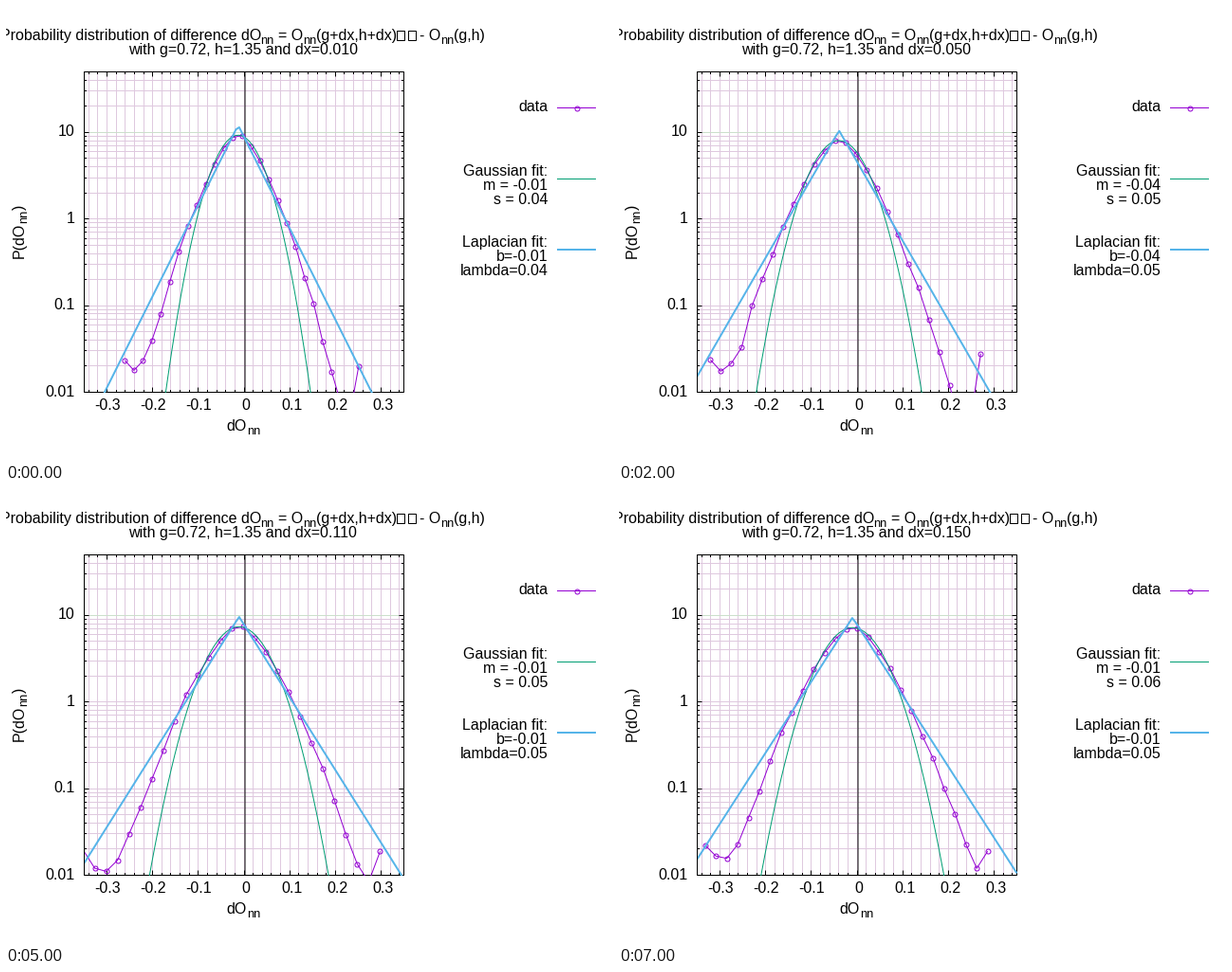
A matplotlib script that plays this animation: 640 px wide and 480 px high, repeating every 8000 ms.

```python
import numpy as np
import matplotlib
import matplotlib.pyplot as plt
from matplotlib.animation import FuncAnimation
from matplotlib.patches import Rectangle

W, H, DPI = 640, 480, 100
PX = 72 / DPI  # one pixel in points
LEFT, RIGHT, TOP, BOTTOM = 82.5, 419.5, 69.5, 407.5
STEPS, BINS = 8, 27
PURPLE, GREEN, BLUE = "#9400d3", "#009e73", "#56b4e9"
GRID, GRID_TEN = "#dfc9df", "#cbdfcb"

# Centre and extent of the distribution at each step.
CENTRE = [-0.013, -0.026, -0.0395, -0.009, -0.0233, -0.011, -0.01, -0.01]
LOW = [-0.261, -0.29, -0.321, -0.306, -0.348, -0.352, -0.342, -0.333]
HIGH = [0.251, 0.261, 0.271, 0.261, 0.234, 0.298, 0.292, 0.286]

matplotlib.rcParams["font.family"] = "Liberation Sans"
fig = plt.figure(figsize=(W / DPI, H / DPI), dpi=DPI, facecolor="white")
ax = fig.add_axes([0, 0, 1, 1])
ax.set_xlim(0, W)
ax.set_ylim(H, 0)
ax.axis("off")


def sx(x):
    return LEFT + (x + 0.35) / 0.7 * (RIGHT - LEFT)


def sy(p):
    return BOTTOM - np.log10(p / 0.01) / np.log10(5000) * (BOTTOM - TOP)


def pixel(v):
    return np.floor(v) + 0.5


def line(x, y, color="black", width=1, **kw):
    return ax.plot(x, y, color=color, lw=width * PX, snap=False,
                   solid_capstyle="butt", **kw)[0]


def label(x, y, s, size=16, **kw):
    return ax.text(x, y, s, fontsize=size * PX, va="baseline", **kw)


def key_label(y, s=""):
    return label(571.4, y, s, ha="right")


def circles(**kw):
    return ax.plot([], [], "o", ms=5 * PX, mfc="none", mec=PURPLE,
                   mew=PX, **kw)[0]


def draw_axes():
    for i in range(-17, 18):
        x = pixel(sx(i / 50))
        size = 2.5 if i % 5 else 5
        line([x, x], [TOP, BOTTOM], GRID, zorder=1)
        line([x, x], [BOTTOM, BOTTOM - size], zorder=3)
        line([x, x], [TOP, TOP + size], zorder=3)
    for e in range(-2, 2):
        for d in range(1, 10):
            p = d * 10.0 ** e
            if not 0.01 < p < 50:
                continue
            y = pixel(sy(p))
            size = 5 if d == 1 else 2.5
            line([LEFT, RIGHT], [y, y], GRID_TEN if p == 10 else GRID, zorder=1)
            line([LEFT, LEFT + size], [y, y], zorder=3)
            line([RIGHT, RIGHT - size], [y, y], zorder=3)
    line([LEFT, RIGHT, RIGHT, LEFT, LEFT],
         [TOP, TOP, BOTTOM, BOTTOM, TOP], zorder=3)
    line([252, 252], [TOP, BOTTOM], zorder=3)
    for i in range(-3, 4):
        shift = 0.5 if i < 0 else 2
        label(sx(i / 10) + shift, 426, f"{i / 10:g}", ha="center")
    for p in (0.01, 0.1, 1, 10):
        label(72.6, round(sy(p) + 4), f"{p:g}", ha="right")


def draw_titles():
    label(-6.2, 36, "Probability distribution of difference dO")
    label(286.9, 36, "= O")
    label(327.5, 36, "(g+dx,h+dx)")
    label(436.2, 36, "- O")
    label(472.4, 36, "(g,h)")
    for x in (268.6, 313.4, 458.4):
        label(x, 40, "nn", 12.8)
    for x in (412.5, 424.5):
        ax.add_patch(Rectangle((x, 26.5), 8, 10, fill=False, lw=PX, snap=False))

    label(232.5, 448, "dO")
    label(253.9, 452, "nn", 12.8)
    upright = dict(rotation=90, rotation_mode="anchor")
    label(18.6, 266, "P(dO", **upright)
    label(22.6, 229, "nn", 12.8, **upright)
    label(18.6, 215, ")", **upright)


def draw_key():
    key_label(111, "data")
    key_label(179, "Gaussian fit:")
    key_label(254, "Laplacian fit:")
    line([581, 622], [107.5, 107.5], PURPLE)
    line([581, 622], [182.5, 182.5], GREEN)
    line([581, 622], [257, 257], BLUE, 2)
    circles().set_data([601.5], [107.5])


def spread(step):
    return 0.0565 - 0.0136 * np.exp(-step / 3)


def gaussian(x, m, s):
    return np.exp(-((x - m) / s) ** 2 / 2) / (s * np.sqrt(2 * np.pi))


def laplacian(x, b, lam):
    return np.exp(-abs(x - b) / lam) / (2 * lam)


def histogram(step):
    """Density between both fits, with a few stray counts at the ends."""
    rng = np.random.default_rng(step)
    m, s = CENTRE[step], spread(step)
    x = np.linspace(LOW[step], HIGH[step], BINS)
    t = abs(x - m) / s
    core = 1.04 * gaussian(m, m, s) * np.exp(-0.61 * t ** 1.5)
    k = np.arange(BINS)
    stray = 0.021 * (np.exp(-k / 2) + np.exp(-2 * k[::-1]))
    noise = np.exp(0.02 * t * rng.standard_normal(BINS))
    return x, (core + stray) * noise


draw_axes()
draw_titles()
draw_key()

plot_box = Rectangle((LEFT, TOP), RIGHT - LEFT, BOTTOM - TOP,
                     transform=ax.transData)
data_line = line([], [], PURPLE, zorder=4)
data_dots = circles(zorder=4)
gauss_line = line([], [], GREEN, zorder=5)
laplace_line = line([], [], BLUE, 2, zorder=6)
for curve in (data_line, gauss_line, laplace_line):
    curve.set_clip_path(plot_box)

subtitle = label(249.7, 51, "", ha="center")
m_text, s_text = key_label(194), key_label(209)
b_text, lam_text = key_label(269), key_label(284)
xs = np.linspace(-0.35, 0.35, 100)


def update(step):
    m, s = CENTRE[step], spread(step)
    lam = 0.96 * s

    x, p = histogram(step)
    shown = (x > -0.35) & (p > 0.01)
    data_line.set_data(sx(x), sy(p))
    data_dots.set_data(sx(x[shown]), sy(p[shown]))
    gauss_line.set_data(sx(xs), sy(gaussian(xs, m, s)))
    laplace_line.set_data(sx(xs), sy(laplacian(xs, m, lam)))

    subtitle.set_text(f"with g=0.72, h=1.35 and dx={0.01 + 0.02 * step:.3f}")
    m_text.set_text(f"m = {m:.2f}")
    s_text.set_text(f"s = {s:.2f}")
    b_text.set_text(f"b={m:.2f}")
    lam_text.set_text(f"lambda={lam:.2f}")
    return (data_line, data_dots, gauss_line, laplace_line, subtitle,
            m_text, s_text, b_text, lam_text)


anim = FuncAnimation(fig, update, frames=STEPS, interval=1000, repeat=True,
                     repeat_delay=0, blit=False)
plt.show()
```
